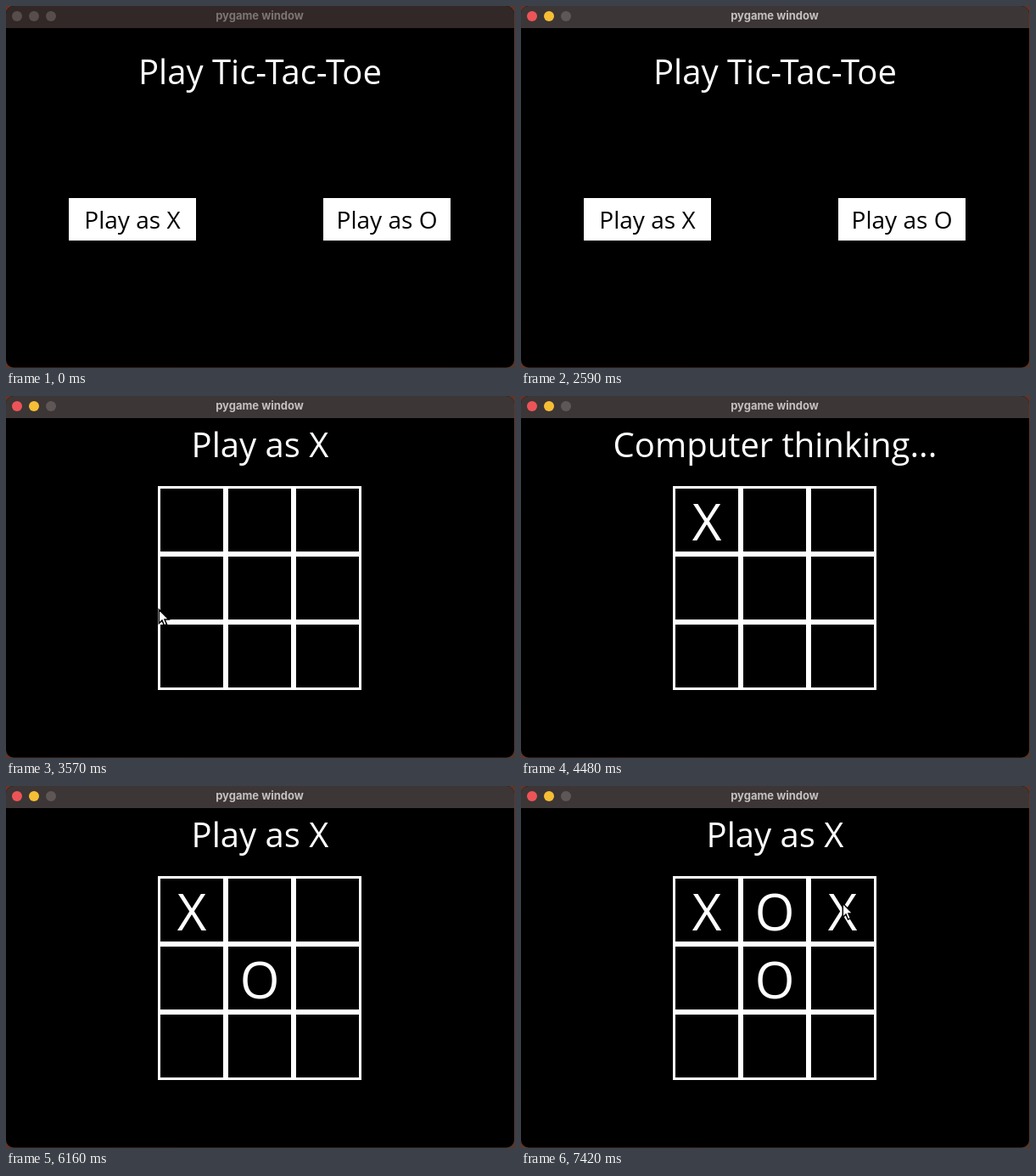
Recreate the animation shown at these times as an HTML page. Size 600x426 px, loop 8000 ms.

```html
<!DOCTYPE html>
<html lang="en">
<head>
<meta charset="utf-8">
<title>pygame window</title>
<style>
html, body { margin: 0; width: 100%; height: 100%; overflow: hidden; background: #000; }
svg { display: block; width: 100%; height: 100%; }
text { text-anchor: middle; font-family: "Open Sans", "Noto Sans", sans-serif; fill: #fff; }
.large { font-size: 40px; }
.medium { font-size: 28px; fill: #000; }
.move { font-size: 60px; }
#name { font: 700 13px Inter, Roboto, sans-serif; }
</style>
</head>
<body>
<svg viewBox="0 0 600 426">
  <defs>
    <linearGradient id="desk" x2="1" y2="1">
      <stop offset="0" stop-color="#6b3226"/>
      <stop offset="1" stop-color="#54382d"/>
    </linearGradient>
    <clipPath id="frame"><rect width="599" height="425.4" rx="9"/></clipPath>
  </defs>
  <rect width="600" height="426" fill="url(#desk)"/>
  <g clip-path="url(#frame)">
    <rect width="600" height="426"/>
    <rect id="bar" width="600" height="26"/>
    <g id="lights"></g>
    <text id="name" x="299" y="16">pygame window</text>
  </g>
  <g id="menu">
    <text class="large" x="299.5" y="92">Play Tic-Tac-Toe</text>
    <rect x="74" y="226" width="150" height="50" fill="#fff"/>
    <rect x="374" y="226" width="150" height="50" fill="#fff"/>
    <text class="medium" x="149" y="262">Play as X</text>
    <text class="medium" x="449" y="262">Play as O</text>
  </g>
  <g id="game">
    <text id="status" class="large" x="299.5" y="72"></text>
    <g id="board" fill="none" stroke="#fff" stroke-width="3"></g>
    <g id="marks"></g>
  </g>
  <path id="cursor" d="M1.3 1.3V17.6L5 14.1L7.5 20L10.5 18.7L8 13H13Z"
        fill="#fff" stroke="#000" stroke-width="1.5"/>
</svg>
<script>
const LOOP = 8000, FOCUS = 2590, START = 3570;
const SVG = "http://www.w3.org/2000/svg";
const $ = id => document.getElementById(id);

const moves = [
  { at: 4480, mark: "X", row: 0, col: 0 },
  { at: 5460, mark: "O", row: 1, col: 1 },
  { at: 6860, mark: "X", row: 0, col: 2 },
  { at: 7350, mark: "O", row: 0, col: 1 }
];

const pointer = [
  { from: 1470, to: 1540, x: 160, y: 243 },
  { from: 3150, to: 4060, x: 179, y: 250 },
  { from: 5250, to: 6160, x: 240, y: 151 },
  { from: 7420, to: LOOP, x: 378, y: 137 }
];

const themes = {
  idle: { bar: "#312827", name: "#7d7573", lights: ["#574e4c", "#574e4c", "#574e4c"] },
  active: { bar: "#3d3636", name: "#c5c1c0", lights: ["#ee5457", "#f6be35", "#5f5756"] }
};

function add(parent, tag, attrs) {
  const el = document.createElementNS(SVG, tag);
  for (const key in attrs) el.setAttribute(key, attrs[key]);
  return parent.appendChild(el);
}

function show(el, on) {
  el.setAttribute("visibility", on ? "visible" : "hidden");
}

const lights = [13, 33, 53].map(cx => add($("lights"), "circle", { cx, cy: 12, r: 6 }));

for (let i = 0; i < 9; i++) {
  add($("board"), "rect", {
    x: 180.5 + 80 * (i % 3), y: 107.5 + 80 * Math.floor(i / 3), width: 77, height: 77
  });
}

for (const move of moves) {
  move.el = add($("marks"), "text", {
    class: "move", x: 219 + 80 * move.col, y: 170 + 80 * move.row
  });
  move.el.textContent = move.mark;
}

function draw(t) {
  const theme = t < FOCUS ? themes.idle : themes.active;
  $("bar").style.fill = theme.bar;
  $("name").style.fill = theme.name;
  lights.forEach((light, i) => light.setAttribute("fill", theme.lights[i]));

  $("menu").style.display = t < START ? "" : "none";
  $("game").style.display = t < START ? "none" : "";
  const played = moves.filter(move => t >= move.at).length;
  $("status").textContent = played % 2 ? "Computer thinking..." : "Play as X";
  moves.forEach((move, i) => show(move.el, i < played));

  const spot = pointer.find(p => t >= p.from && t < p.to);
  show($("cursor"), spot);
  if (spot) $("cursor").setAttribute("transform", `translate(${spot.x} ${spot.y})`);
}

const begin = performance.now();
function tick() {
  draw((performance.now() - begin) % LOOP);
  requestAnimationFrame(tick);
}
tick();
</script>
</body>
</html>
```
